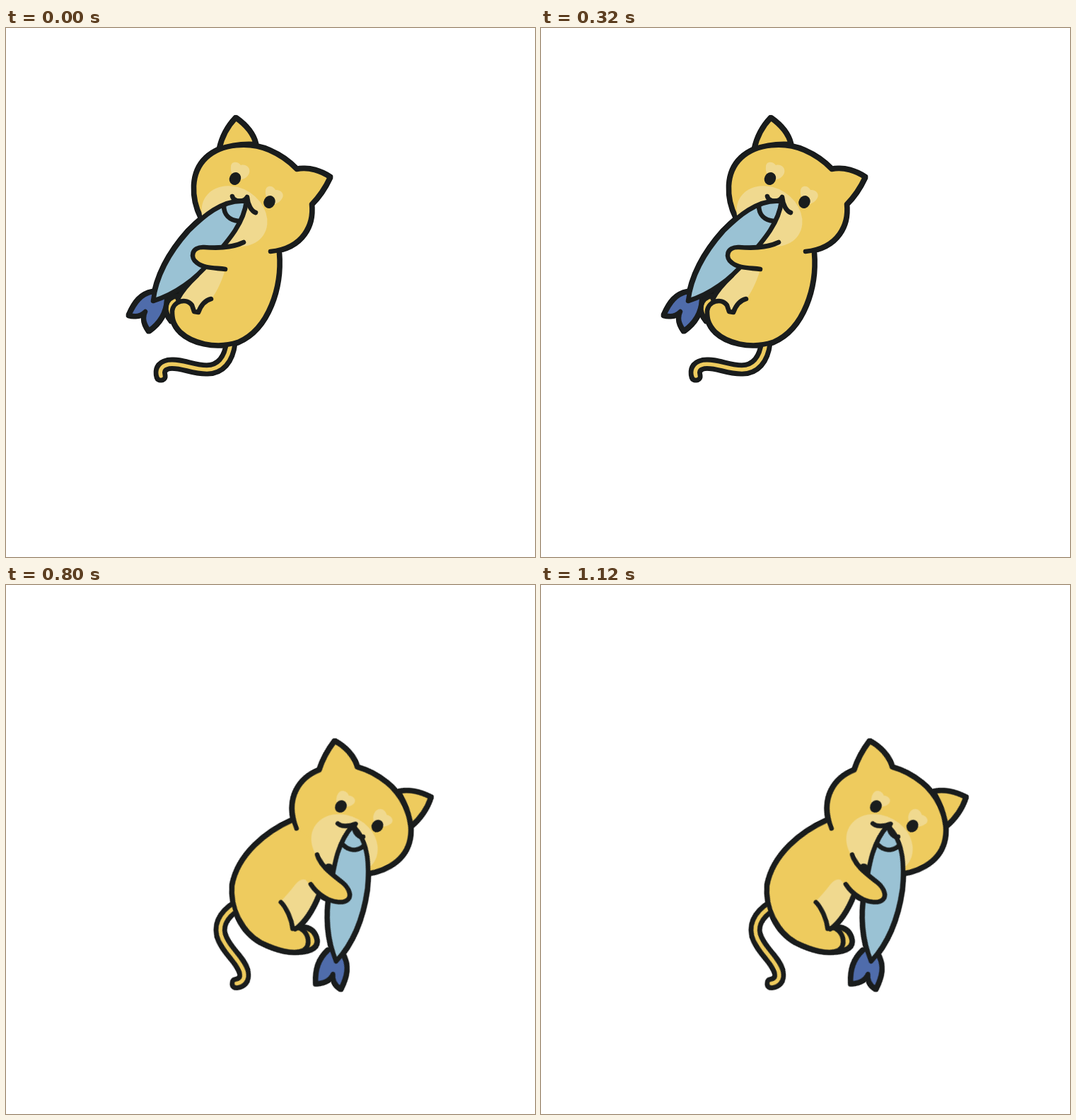
An HTML page for the animation above (1280 ms loop, 748 by 748 pixels).

```html
<!DOCTYPE html>
<html lang="en">
<head>
<meta charset="utf-8">
<title>Cat with a fish</title>
<style>
  html, body { margin: 0; width: 100%; height: 100%; overflow: hidden; background: #fff; }
  svg { display: block; width: 100%; height: 100%; }
  .ink { stroke: #1a1d1d; stroke-width: 6.6; stroke-linecap: round; stroke-linejoin: round; fill: none; }
  .fur { fill: #eecb5e; }
  .pale { fill: #f0d98f; }
  .fish { fill: #9ac2d4; }
  .fin { fill: #4f6cab; }
  .eye { fill: #1a1d1d; }
  .tail { fill: none; stroke-linecap: round; stroke: #1a1d1d; stroke-width: 17; }
  .tail + .tail { stroke: #eecb5e; stroke-width: 5.5; }

  /* Each element is shown for the first half of its cycle. */
  @keyframes show { 50% { opacity: 0; } }
  .side { animation: show 1280ms step-end infinite; }
  .pose { animation: show 320ms step-end infinite; }
  .side.late { animation-delay: -640ms; }
  .pose.late { animation-delay: -160ms; }
</style>
</head>
<body>
<svg viewBox="0 0 748 748">
  <defs>
    <!-- Thickens the outer contour only. -->
    <filter id="rim" filterUnits="userSpaceOnUse" x="0" y="0" width="748" height="748" color-interpolation-filters="sRGB">
      <feMorphology in="SourceAlpha" operator="dilate" radius="1.4" result="grown"/>
      <feFlood flood-color="#141616"/>
      <feComposite in2="grown" operator="in"/>
      <feMerge><feMergeNode/><feMergeNode in="SourceGraphic"/></feMerge>
    </filter>

    <path id="tail-line" d="M318 444C315 470 302 483 284 483C262 483 248 473 230 475.500C218 478 217 486 219 492"/>
    <g id="tail">
      <use href="#tail-line" class="tail"/>
      <use href="#tail-line" class="tail"/>
    </g>

    <g id="head">
      <path class="ink fur" d="M276 268C262 240 261 205 283 184C305 163 345 161 372 173Q395 183 411 200C428 196 446 203 458 211C451 226 443 238 432 249C435 277 421 311 374 316"/>
      <path class="ink fur" d="M302 171C306 153 315 138 325 127.500C337 136 349 148 353 164C336 163 317 165 302 171"/>
      <ellipse class="pale" cx="323" cy="266" rx="49" ry="40" transform="rotate(33 323 266)"/>
      <path class="pale" d="M318 196C318 188 328 188 332 194C340 192 346 198 344 205C342 211 336 214 330 215C320 210 317 204 318 196"/>
      <path class="pale" d="M367 230C368 222 377 222 381 229C388 228 394 234 391 240C388 246 383 248 378 250C370 245 366 237 367 230"/>
      <ellipse class="eye" cx="324" cy="213" rx="8" ry="9.200" transform="rotate(28 324 213)"/>
      <ellipse class="eye" cx="372.500" cy="246" rx="8" ry="9.200" transform="rotate(28 372.500 246)"/>
    </g>

    <path id="mouth" class="ink" d="M320 238C322 246 337 247 341 239C342 250 347 259 353 261"/>

    <g id="fish" class="ink">
      <path class="fin" d="M208 373C191 376 182 388 174 406C184 409 191 407 197 401C192 412 197 421 202 428C216 418 226 404 227 385"/>
      <path class="fish" d="M340 245C306 241 277 268 258 287C232 316 213 348 208 386C240 376 268 355 288 331C312 303 336 278 340 245Z"/>
      <path d="M308 251C308 264 316 272 329 273"/>
    </g>

    <g id="curled">
      <use href="#tail"/>
      <path class="ink fur" d="M242 379C224 382 222 400 234 414"/>
      <path class="fur" d="M387 316C390 365 372 425 328 444C295 455 262 444 247 430C234 416 232 400 240 388L250 370L300 270H380Z"/>
      <path class="pale" d="M309 345L280 340C262 355 250 368 245 384C255 382 262 392 266 400L273 401C276 391 284 384 290 384C300 370 305 357 309 345"/>
      <path class="ink" d="M386 318C390 365 372 425 328 444C295 455 262 444 247 430C235 418 235 408 235 400C237 386 255 381 263 392L266 401L272 402C276 391 282 385 290 383M243 383C248 373 256 363 270 350"/>
      <use href="#head"/>
      <use href="#fish"/>
      <use href="#mouth"/>
      <path class="ink fur" d="M336 303C318 312 295 311 280 310C262 309 260 325 270 332C280 340 295 339 310 341"/>
    </g>

    <g id="stretched">
      <use href="#tail" x="-7" y="-2"/>
      <path class="ink fur" d="M216 394C207 374 210 362 222 360.500C235 359 242 366 246 376"/>
      <path class="fur" d="M387 318C388 360 376 410 340 436C312 452 276 452 250 434C231 419 214 400 214 384C216 372 232 366 245 376L246 382C250 363 262 346 276 331L300 270H380Z"/>
      <path class="pale" d="M248 384C252 362 263 346 278 333L303 339C309 346 303 355 299 363Q294 374 290 384C275 380 260 381 248 384"/>
      <path class="ink" d="M387 320C388 360 376 410 340 436C312 452 276 452 250 434C231 419 214 400 214 384C216 372 232 366 245 376L248 385C260 381 278 380 289 384M246 382C250 363 262 346 276 331"/>
      <g transform="rotate(2.300 285 318)"><use href="#head"/></g>
      <path class="ink fur" d="M297 304Q305 296 307 302"/>
      <g transform="translate(3.500 1) rotate(14.600 340 245)"><use href="#fish"/></g>
      <g transform="rotate(2.300 285 318)"><use href="#mouth"/></g>
      <path class="ink fur" d="M328 309C312 311 298 304 282 296C266 287 248 288 252 305C258 322 278 333 294 335"/>
    </g>
  </defs>

  <g class="side" filter="url(#rim)">
    <use class="pose" href="#curled"/>
    <use class="pose late" href="#stretched"/>
  </g>
  <g class="side late" filter="url(#rim)">
    <g class="pose" transform="translate(469.500 219.500) rotate(64.700) scale(-1 1) translate(-460 -210)">
      <use href="#curled"/>
    </g>
    <g class="pose late" transform="translate(465 219) rotate(64.700) scale(-1 1) translate(-464 -217)">
      <use href="#stretched"/>
    </g>
  </g>
</svg>
</body>
</html>
```
